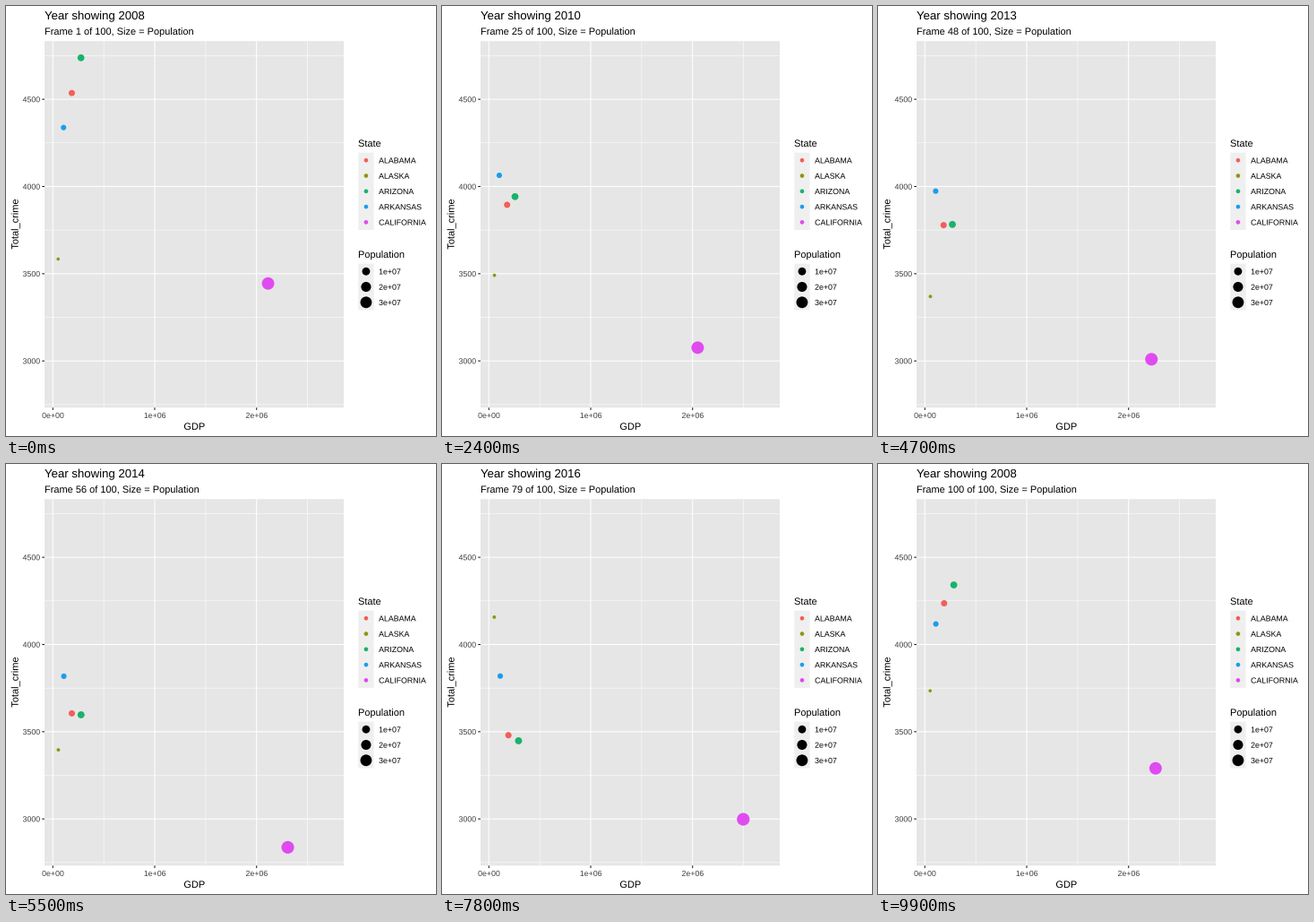
Recreate the animation shown at these times as a matplotlib script. Size 480x480 px, loop 10 s.

```python
import numpy as np
import matplotlib.pyplot as plt
from matplotlib.animation import FuncAnimation
from matplotlib.patches import Circle, PathPatch, Rectangle
from matplotlib.textpath import TextPath
from matplotlib.transforms import Affine2D

FRAMES, INTERVAL = 100, 100
SIZE, DPI = 480, 100
PX = 72 / DPI  # points per pixel

plt.rcParams["font.family"] = "Liberation Sans"
plt.rcParams["toolbar"] = "None"

LEFT, RIGHT, TOP, BOTTOM = 43, 377, 39.2, 448.3
GREY, KEY, DARK, TICK = "#e6e6e6", "#efefef", "#404040", "#222222"

YEARS = np.arange(2008, 2019)
TURNS = [2008, 2009, 2010, 2011, 2012, 2014, 2015, 2016, 2018]

# name: (colour, population in millions at both ends,
#        GDP in billions at start, dip and end, crime rate at the turning years)
STATES = {
    "ALABAMA": ("#f35e5a", (4.66, 4.89), (186, 178.5, 198.5),
                [4536, 4222, 3895, 4025, 3952, 3605, 3451, 3480, 3337]),
    "ALASKA": ("#929410", (0.686, 0.737), (52, 55, 52),
               [3584, 3579, 3491, 3240, 3343, 3396, 3549, 4157, 4186]),
    "ARIZONA": ("#18b369", (6.5, 7.17), (276, 255, 309),
                [4738, 3965, 3942, 3960, 3968, 3597, 3443, 3448, 3152]),
    "ARKANSAS": ("#1a9dee", (2.855, 3.014), (105, 102, 116.5),
                 [4338, 4292, 4064, 4235, 4129, 3818, 3773, 3819, 3457]),
    "CALIFORNIA": ("#df4bf0", (36.76, 39.56), (2113, 2027, 2722),
                   [3444, 3204, 3076, 2995, 3182, 2837, 3045, 2998, 2828]),
}


def px_x(gdp):
    return 52.3 + 0.1137 * gdp


def px_y(crime):
    return 57.8 + (4738 - crime) * 0.1947


def gdp_curve(start, dip, end):
    """One year of decline, then accelerating growth."""
    growth = np.linspace(0, 1, len(YEARS) - 1) ** 1.55
    return np.append(start, dip + (end - dip) * growth)


def radius(size):
    return 0.375 * (size * 2.845 + 0.945) + 0.354


def pop_radius(pop):
    share = (np.asarray(pop) - 0.686) / (39.56 - 0.686)
    return radius(1 + 5 * np.sqrt(share))


def build_timeline():
    """List of (state, next state, fraction): hold 5, move 4 or 5."""
    steps = []
    n = len(YEARS)
    for k in range(n):
        nxt = (k + 1) % n
        move = 5 if k < 2 else 4
        steps += [(k, nxt, 0.0)] * 5
        steps += [(k, nxt, j / move) for j in range(1, move + 1)]
    return steps[:FRAMES]


timeline = build_timeline()

fig = plt.figure(figsize=(SIZE / DPI, SIZE / DPI), dpi=DPI, facecolor="white")
ax = fig.add_axes([0, 0, 1, 1])
ax.set_xlim(0, SIZE)
ax.set_ylim(SIZE, 0)
ax.axis("off")


def label(x, y, s, size, color="black", align=0.0, angle=0):
    """Outlined text on a baseline; align 0 is left, 0.5 centre, 1 right."""
    path = TextPath((0, 0), s, size=size)
    shift = align * path.get_extents().x1
    move = (Affine2D().translate(-shift, 0).scale(1, -1)
            .rotate_deg(angle).translate(x, y))
    patch = PathPatch(path, fc=color, ec="none", lw=0, snap=False, zorder=2)
    patch.set_transform(move + ax.transData)
    return ax.add_artist(patch)


def line(xs, ys, color, width):
    ax.plot(xs, ys, color=color, lw=width * PX, solid_capstyle="butt",
            snap=False, zorder=1)


def box(x, y, w, h, color):
    ax.add_patch(Rectangle((x, y), w, h, fc=color, ec="none", snap=False,
                           zorder=0))


def dot(x, y, r, color):
    return ax.add_patch(Circle((x, y), r, fc=color, ec="none", zorder=3))


def draw_panel():
    box(LEFT, TOP, RIGHT - LEFT, BOTTOM - TOP, GREY)
    for gdp in range(500, 2501, 1000):
        line([px_x(gdp)] * 2, [TOP, BOTTOM], "white", 0.53)
    for crime in range(2750, 4751, 500):
        line([LEFT, RIGHT], [px_y(crime)] * 2, "white", 0.53)
    for gdp in range(0, 2001, 1000):
        x = px_x(gdp)
        line([x, x], [TOP, BOTTOM], "white", 1.07)
        line([x, x], [BOTTOM, BOTTOM + 2.75], TICK, 1.07)
        label(x, 460, f"{gdp * 1000:.0e}", 8.8, DARK, align=0.5)
    for crime in range(3000, 4501, 500):
        y = px_y(crime)
        line([LEFT, RIGHT], [y, y], "white", 1.07)
        line([LEFT - 2.75, LEFT], [y, y], TICK, 1.07)
        label(37.8, y + 3.2, str(crime), 8.8, DARK, align=1)
    label(210, 473, "GDP", 11, align=0.5)
    label(13.6, 243.8, "Total_crime", 11, align=0.5, angle=-90)


def draw_legend(title, base, items):
    left, key = 393.3, 17.28
    top = base + 6.6
    label(left - 0.3, base, title, 11)
    box(left, top, key, key * len(items), KEY)
    for i, (name, r, color) in enumerate(items):
        y = top + key * (i + 0.5)
        dot(left + key / 2, y, r, color)
        label(left + key + 5.5, y + 3.2, name, 8.8)


draw_panel()
draw_legend("State", 157,
            [(name, radius(1.5), s[0]) for name, s in STATES.items()])
draw_legend("Population", 281,
            [(f"{p}e+07", pop_radius(10 * p), "black") for p in (1, 2, 3)])

title = label(43, 15, "Year", 13.2)
subtitle = label(43, 32, "Frame", 11)

tracks = []
for color, pops, gdp, crime in STATES.values():
    track = np.column_stack([
        px_x(gdp_curve(*gdp)),
        px_y(np.interp(YEARS, TURNS, crime)),
        pop_radius(np.linspace(*pops, len(YEARS))),
    ])
    tracks.append((dot(*track[0], color), track))


def update(i):
    k, nxt, f = timeline[i]
    for circle, track in tracks:
        x, y, r = track[k] * (1 - f) + track[nxt] * f
        circle.center = x, y
        circle.set_radius(r)
    year = YEARS[nxt if f > 0.5 else k]
    title.set_path(TextPath((0, 0), f"Year showing {year}", size=13.2))
    subtitle.set_path(TextPath(
        (0, 0), f"Frame {i + 1} of {FRAMES}, Size = Population", size=11))
    return [title, subtitle] + [c for c, _ in tracks]


anim = FuncAnimation(fig, update, frames=FRAMES, interval=INTERVAL,
                     init_func=lambda: update(0), repeat=True, repeat_delay=0)
plt.show()
```
